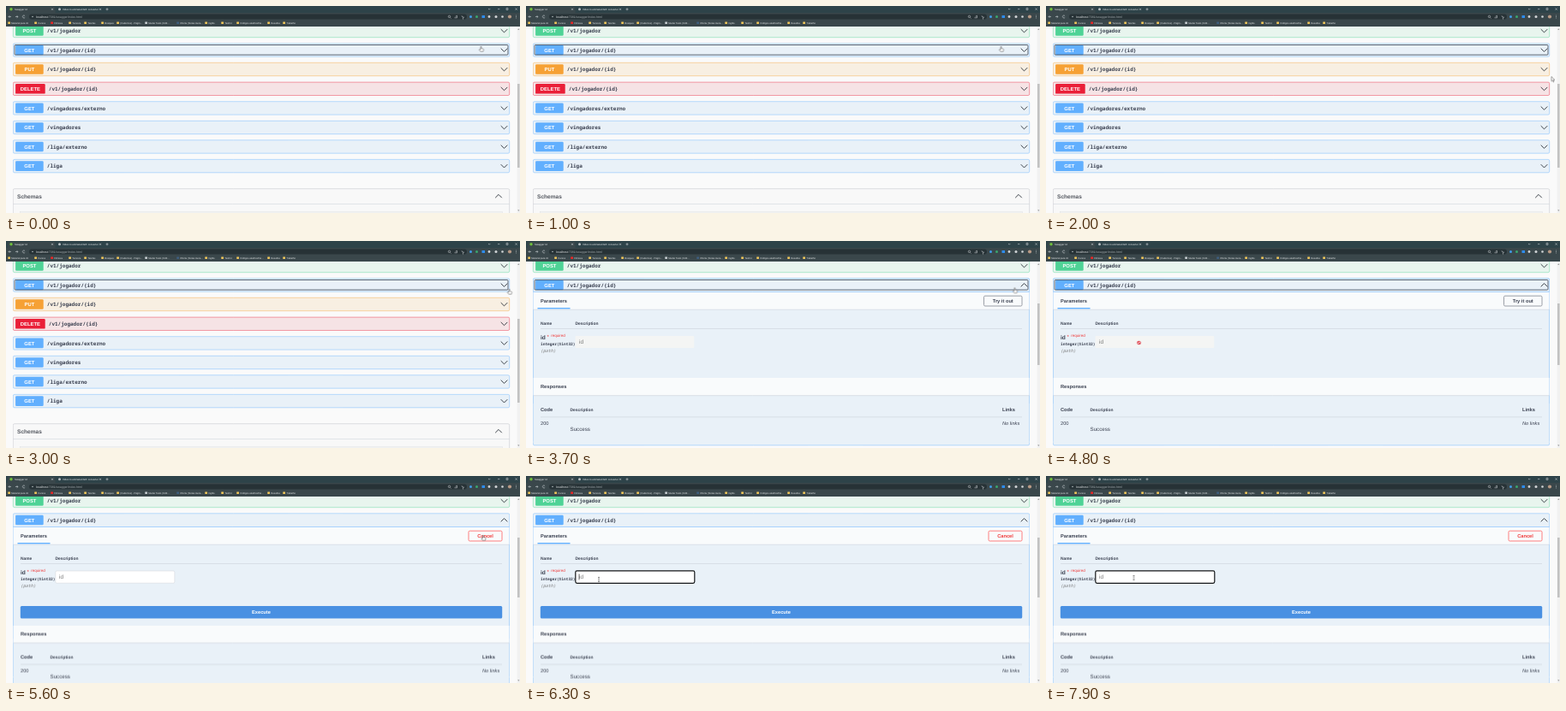
An HTML page that plays this animation: 600x242 px, repeating every 8000 ms.

```html
<!DOCTYPE html>
<html lang="pt">
<head>
<meta charset="utf-8">
<title>API docs</title>
<style>
html, body { margin: 0; width: 100%; height: 100%; overflow: hidden; background: #fafafa; }
svg { display: block; width: 600px; height: 242px; }
text { font-family: Arial, "Liberation Sans", sans-serif; fill: #3b4151; text-rendering: geometricPrecision; white-space: pre; }
.b { font-weight: 700; }
.i { font-style: italic; }
.m { font-family: "Noto Sans Mono", "DejaVu Sans Mono", monospace; font-weight: 600; }
.w { fill: #fff; }
.red { fill: #f03a3a; }
.hint { fill: #757575; }
.ui { fill: #eceeef; }
.dim { fill: #a3abae; }
.mid { text-anchor: middle; }
.line { fill: none; stroke: #c6cdd5; stroke-width: .5; }
.chev { fill: none; stroke: #2b3038; stroke-width: .9; }
.icon { fill: none; stroke: #c9cfd2; stroke-width: .6; }
.ring { fill: none; stroke: #2c3a4b; stroke-width: .75; }

/* page states */
.closed, .open, .view, .edit, .focus, .idle, .caret, .ring,
.hand, .arrow, .no, .beam { animation: 8s step-end infinite; }
.closed { animation-name: closed; }
.open { animation-name: open; }
.view { animation-name: view; }
.edit { animation-name: edit; }
.focus { animation-name: focus; }
.idle { animation-name: idle; }
.caret { animation-name: caret; }
.ring { animation-name: ring; }
@keyframes closed { 0% { opacity: 1 } 46.25%, 100% { opacity: 0 } }
@keyframes open { 0% { opacity: 0 } 46.25%, 100% { opacity: 1 } }
@keyframes view { 0% { opacity: 0 } 46.25% { opacity: 1 } 70%, 100% { opacity: 0 } }
@keyframes edit { 0% { opacity: 0 } 70%, 100% { opacity: 1 } }
@keyframes ring { 0% { opacity: 1 } 70%, 100% { opacity: 0 } }
@keyframes idle { 0% { opacity: 0 } 70% { opacity: 1 } 75%, 100% { opacity: 0 } }
@keyframes focus { 0% { opacity: 0 } 75%, 100% { opacity: 1 } }
@keyframes caret { 0% { opacity: 0 } 75% { opacity: 1 } 81.25% { opacity: 0 } 87.5% { opacity: 1 } 93.75%, 100% { opacity: 0 } }
.shift { animation: shift 8s step-end infinite; }
@keyframes shift { 0% { transform: none } 70%, 100% { transform: translateY(14.5px) } }

/* pointer */
.cursor { animation: travel 8s ease-in-out infinite; }
@keyframes travel {
  0%, 12.5% { transform: translate(554.5px, 47px) }
  20% { transform: translate(594px, 80px) }
  25%, 30% { transform: translate(590px, 82.5px) }
  36.25%, 38% { transform: translate(587.5px, 56px) }
  45%, 50% { transform: translate(570.5px, 54.5px) }
  57.5%, 61.25% { transform: translate(108.5px, 119px) }
  67.5%, 70% { transform: translate(557px, 69px) }
  75%, 83% { transform: translate(85px, 121px) }
  90%, 100% { transform: translate(102.5px, 119px) }
}
.hand { animation-name: hand; }
.arrow { animation-name: arrow; }
.no { animation-name: no; }
.beam { animation-name: beam; }
@keyframes hand { 0% { opacity: 1 } 16.25% { opacity: 0 } 35% { opacity: 1 } 51.25% { opacity: 0 } 66.5% { opacity: 1 } 70.5%, 100% { opacity: 0 } }
@keyframes arrow { 0% { opacity: 0 } 16.25% { opacity: 1 } 35% { opacity: 0 } 51.25% { opacity: 1 } 55% { opacity: 0 } 63.25% { opacity: 1 } 66.5% { opacity: 0 } 70.5% { opacity: 1 } 73.5%, 100% { opacity: 0 } }
@keyframes no { 0% { opacity: 0 } 55% { opacity: 1 } 63.25%, 100% { opacity: 0 } }
@keyframes beam { 0% { opacity: 0 } 73.5%, 100% { opacity: 1 } }
</style>
</head>
<body>
<svg id="stage" viewBox="0 0 600 242"></svg>
<script>
const text = (x, cy, size, str, cls = '') =>
  `<text x="${x}" y="${cy + size * .36}" font-size="${size}" class="${cls}">${str}</text>`;
const rect = (x, y, w, h, fill, more = '') =>
  `<rect x="${x}" y="${y}" width="${w}" height="${h}" fill="${fill}" ${more}/>`;
const dot = (x, y, r, fill) => `<circle cx="${x}" cy="${y}" r="${r}" fill="${fill}"/>`;
const path = (d, cls, more = '') => `<path d="${d}" class="${cls}" ${more}/>`;
const group = (cls, ...parts) => `<g class="${cls}">${parts.join('')}</g>`;
const chevron = (x, y, dir) => path(`M${x - 3.8} ${y - 1.9 * dir}l3.8 ${3.8 * dir} 3.8 ${-3.8 * dir}`, 'chev');
const rule = y => path(`M17 ${y}H579`, 'line');

const verbs = {
  POST: ['#4fd396', '#e8f5ee'],
  GET: ['#61affe', '#e9f1f8'],
  PUT: ['#f6a135', '#f8efe2'],
  DELETE: ['#ea1f38', '#f6e3e5']
};

const box = (y, h, verb) =>
  rect(8.3, y, 579.4, h, verbs[verb][1], `rx="1.6" stroke="${verbs[verb][0]}" stroke-width=".42"`);

function label(cy, verb, route) {
  const w = verb === 'DELETE' ? 34.6 : 32.6;
  return rect(11.1, cy - 5.8, w, 11.6, verbs[verb][0], 'rx="1.2"') +
    text(11.1 + w / 2, cy, 5.9, verb, 'b w mid') +
    text(w + 15.2, cy, 6, route, 'm');
}

const row = (cy, verb, route) =>
  box(cy - 7.7, 15.4, verb) + label(cy, verb, route) + chevron(581.5, cy, 1);

const button = (x, w, str, stroke, cls) =>
  rect(x, 64.2, w, 11.8, 'none', `rx="1.4" stroke="${stroke}" stroke-width=".8"`) +
  text(x + w / 2, 70, 5.7, str, 'b mid ' + cls);

const thumb = (y, h) => rect(597, y, 2.6, h, '#c1c1c1');

const endpoints = [
  [74, 'PUT', '/v1/jogador/{id}'],
  [96.8, 'DELETE', '/v1/jogador/{id}'],
  [119.4, 'GET', '/vingadores/externo'],
  [142, 'GET', '/vingadores'],
  [164.5, 'GET', '/liga/externo'],
  [187.1, 'GET', '/liga']
];

const collapsed = group('closed',
  row(51.5, 'GET', '/v1/jogador/{id}'),
  ...endpoints.map(e => row(...e)),
  rect(8.3, 213.7, 579.4, 40, '#f8f8f8', 'rx="1.6" stroke="#b5b8bf" stroke-width=".42"'),
  text(13, 222.3, 6.6, 'Schemas', 'b" style="fill:#565a62'),
  chevron(575, 222.3, -1),
  path('M8.3 231.5H587.7', 'line'),
  rect(16.5, 240.7, 563, 8, '#f1f1f1', 'stroke="#d9dbde" stroke-width=".4"'),
  thumb(91, 98));

const responses = group('shift',
  rect(8.6, 160, 578.8, 20.5, '#f9fbfc'),
  path('M8.6 180.7H587.4', 'line'),
  text(17, 170.2, 5.7, 'Responses', 'b'),
  text(17, 197, 5.7, 'Code', 'b'),
  text(51.5, 197, 4.9, 'Description', 'b'),
  text(556, 197, 5.7, 'Links', 'b'),
  rule(205.8),
  text(17, 213, 5.7, '200'),
  text(556, 213, 5.7, 'No links', 'i'),
  text(51.5, 220, 6.2, 'Success'));

const expanded = group('open',
  group('shift', box(43.8, 195, 'GET')),
  box(43.8, 190, 'GET'),
  rect(8.7, 190, 578.6, 46, verbs.GET[1]),
  label(51.5, 'GET', '/v1/jogador/{id}'),
  chevron(581.5, 51.5, -1),
  rect(8.6, 59.6, 578.8, 20.4, '#f9fbfc'),
  path('M8.6 59.5H587.4', 'line', 'style="stroke:#61affe"'),
  path('M8.6 80.2H587.4', 'line'),
  text(17, 70, 5.7, 'Parameters', 'b'),
  rect(13.5, 78, 38, 1.4, '#61affe'),
  group('view', button(534.5, 44.5, 'Try it out', '#858992', '')),
  group('edit', button(540, 39, 'Cancel', '#ff6060', 'red')),
  text(17, 96.2, 4.9, 'Name', 'b'),
  text(57.5, 96.2, 4.9, 'Description', 'b'),
  rule(102.5),
  text(17, 112.3, 6.6, 'id', 'b'),
  text(24.5, 112.3, 6, '*', 'red'),
  text(29.3, 110.5, 4.5, 'required', 'red'),
  text(17, 120.8, 4.5, 'integer($int32)', 'm'),
  `<text x="17" y="130.3" font-size="4.9" class="i m hint" style="font-weight:400">(path)</text>`,
  group('view', rect(57.5, 111, 138.8, 14, '#f4f5f4', 'rx=".8"')),
  group('edit',
    rect(57.8, 111, 139, 14.2, '#fff', 'rx="1.5"'),
    rect(16.8, 152, 562.4, 14.4, '#4990e2', 'rx="1.5"'),
    text(298, 159.2, 5.7, 'Execute', 'b w mid')),
  group('idle', rect(57.8, 111, 139, 14.2, 'none', 'rx="1.5" stroke="#d0d3d7" stroke-width=".5"')),
  group('focus', rect(57.8, 110.8, 139, 14.5, 'none', 'rx="1.7" stroke="#151719" stroke-width="1.2"')),
  text(62, 118, 6.4, 'id', 'hint'),
  group('caret', rect(61.7, 114.5, .6, 7, '#222')),
  responses,
  group('view', thumb(73, 72)),
  group('edit', thumb(72, 70)));

const bookmarks = [
  [3, 'Material para int'], [34, 'Cursos'], [53, 'Filmoxa', '#ee2626'], [74, 'Tunevra'],
  [92, 'Tarefas'], [112, 'Bosques'], [130, '(Cadernos) - Págin…'],
  [163, 'Mudar Texto | Edit…', '#c4cacd'], [200, 'Oferta | Notas Gera…', '#3f5f80'],
  [233, 'Inglês'], [252, 'TestInt'], [270, 'Códigos+atalhosPar…'],
  [306, 'Desafios'], [324, 'Trabalho']
];

const stripColor = '#2e4349', barColor = '#3a474b';
const browser = group('',
  rect(0, 0, 600, 8, stripColor),
  path('M2 8V2.5Q2 1 3.5 1H56Q57.5 1 57.5 2.5V8Z', '', `fill="${barColor}"`),
  dot(6, 3.8, 1.7, '#6fbf3b'),
  text(10, 3.8, 2.9, 'Swagger UI', 'ui'),
  dot(62.5, 3.8, 1.5, '#b3babd'),
  text(66, 3.8, 2.9, 'Video to animated GIF converter', 'ui'),
  path('M53 2.8l2 2m0-2l-2 2M109 2.8l2 2m0-2l-2 2M116.5 3.8h3m-1.5-1.5v3M563 3l1.2 1.2 1.2-1.2M574 3.6h2.4M584 2.5h2v2h-2zM594.5 2.5l2.2 2.2m0-2.2l-2.2 2.2', 'icon'),
  rect(0, 8, 600, 16, barColor),
  path('M6 12.5H3m1.3-1.3L3 12.5l1.3 1.3M11 12.5h3m-1.3-1.3l1.3 1.3-1.3 1.3M22 11.5a1.5 1.5 0 1 0 .2 1.7', 'icon'),
  rect(27, 9.5, 511, 6, '#273236', 'rx="3"'),
  dot(31, 12.5, .8, '#b3babd'),
  `<text x="35" y="13.7" font-size="3.5" class="ui">localhost:<tspan class="dim">7081/swagger/index.html</tspan></text>`,
  path('M518.5 13.5l1 1M523.5 13.8h3v-2.5m-2 1l2-1M532 11.3l.8 1.7 1.8.2-1.3 1 .3 1.4', 'icon'),
  `<circle cx="517.5" cy="12.4" r="1.2" class="icon"/>`,
  dot(542.5, 12.5, 1.5, '#3f9be8'), dot(549.5, 12.5, 1.5, '#3aa76d'),
  rect(555.5, 11, 3.5, 3, '#2d8df0'), dot(564, 12.5, 1.4, '#d2d5d7'),
  dot(572, 12.5, 1.5, '#d2d5d7'), dot(579.5, 12.5, 1.3, '#d2d5d7'), dot(588, 12.5, 2.1, '#b99b86'),
  ...[11, 12.5, 14].map(y => dot(595.5, y, .45, '#d2d5d7')),
  ...bookmarks.map(([x, str, fill = '#eec55a']) =>
    rect(x - .8, 18.4, 2.8, 2.6, fill, 'rx=".4"') + text(x + 3.3, 19.8, 2.75, str, 'ui')));

const handShape = 'M-.6 .5Q0-.3 .6 .5V2.7L2.6 3.2Q3.1 3.5 3 4.4L2.5 6.2H-.6L-2.2 4.1Q-2.2 3.1-.6 4Z';
const arrowShape = 'M0 0V5.4L1.3 4.3 2.2 6.3 3 6 2.2 4H3.9Z';
const outline = 'fill="#fff" stroke="#333" stroke-width=".45"';
const pointer = group('cursor',
  path(handShape, 'hand', outline),
  path(arrowShape, 'arrow', outline),
  path('M-1.8 0a1.8 1.8 0 1 0 3.6 0a1.8 1.8 0 1 0-3.6 0M-1.3-1.3l2.6 2.6', 'no', 'fill="#fff" stroke="#d8202c" stroke-width=".9"'),
  path('M-1-2.7Q0-2.7 0-2.2Q0-2.7 1-2.7M0-2.2V2.2M-1 2.7Q0 2.7 0 2.2Q0 2.7 1 2.7', 'beam', 'fill="none" stroke="#333" stroke-width=".55"'));

document.getElementById('stage').innerHTML = [
  rect(0, 0, 600, 242, '#fafafa'),
  row(29, 'POST', '/v1/jogador'),
  rect(596.5, 24, 3.5, 218, '#f1f1f1'),
  collapsed,
  expanded,
  `<rect x="10" y="45.5" width="576" height="11.6" rx="1" class="ring"/>`,
  path('M597.2 27.7l1.1-1.3 1.1 1.3zM597.2 238.5l1.1 1.3 1.1-1.3z', '', 'fill="#777"'),
  browser,
  pointer
].join('');
</script>
</body>
</html>
```
